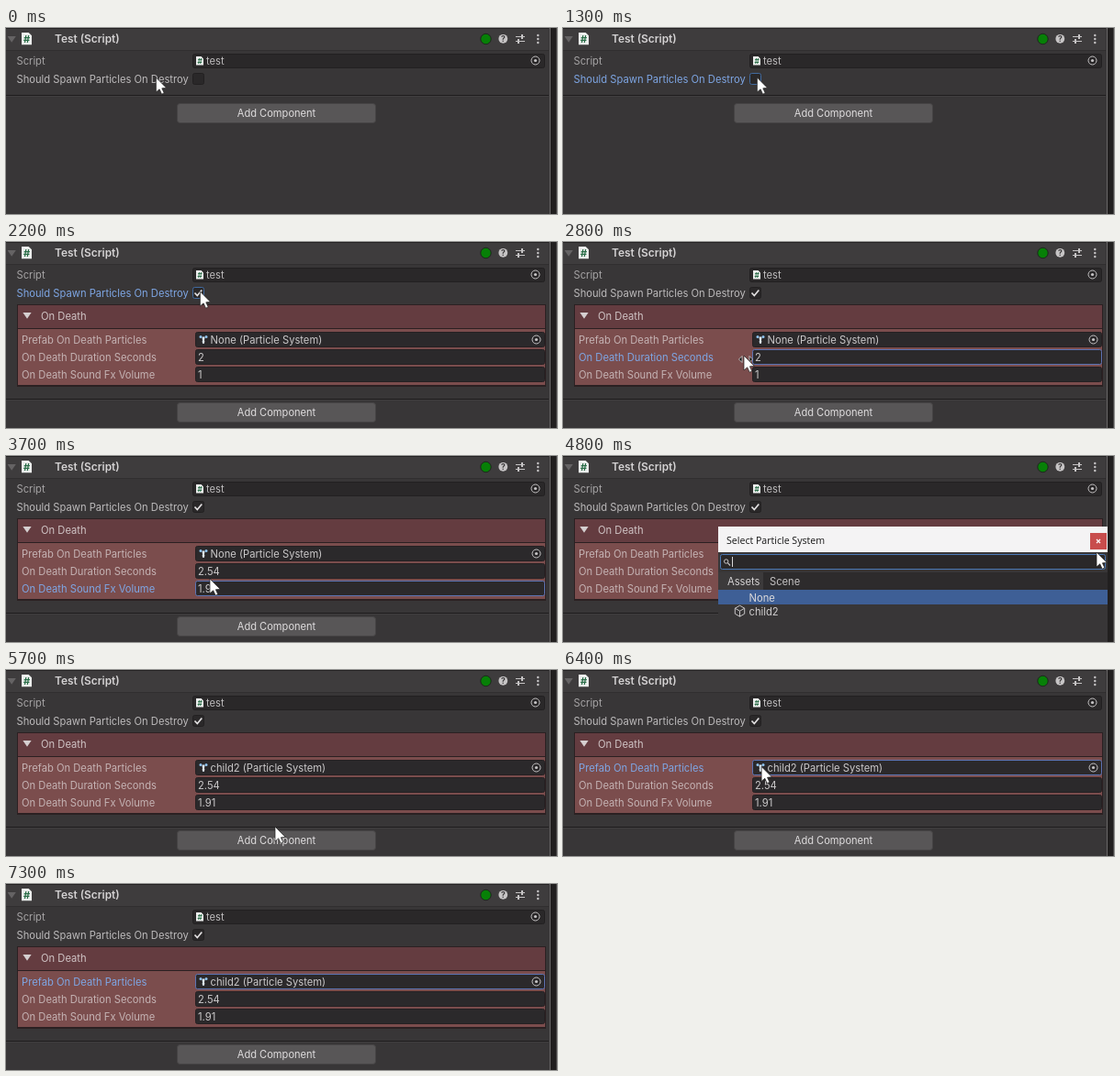
An HTML page with a canvas that plays this animation: 600 by 203 pixels, repeating every 8.2 s.

```html
<!DOCTYPE html>
<html lang="en">
<head>
<meta charset="utf-8">
<title>Inspector</title>
<style>
  html, body { margin: 0; width: 600px; height: 203px; overflow: hidden; background: #383637; }
  canvas { display: block; width: 600px; height: 203px; }
</style>
</head>
<body>
<canvas id="stage"></canvas>
<script>
const LOOP = 8200, STEP = 100;
const canvas = document.getElementById('stage');
const dpr = window.devicePixelRatio || 1;
canvas.width = 600 * dpr;
canvas.height = 203 * dpr;
const ctx = canvas.getContext('2d');

const FONT = 'Inter, "Open Sans", sans-serif';
const LABEL = '#bdbbbc', ICON = '#c6c4c5', DARK = '#2a2829', EDGE = '#222021';
const BLUE = '#7ea6e4', RED_LABEL = '#c5b3b4', BACK = '#383637';
const ARROW = new Path2D('M0 0V16L3.7 12.8 6.2 18.2 8.8 17 6.4 11.8 11.3 11.4Z');

// Pointer moves after the opening sweep; bow lifts the middle of the way
const MOVES = [
  { from: 2200, to: 2700, x: 197, y: 124, bow: 78 },
  { from: 2900, to: 3200, x: 215, y: 125 },
  { from: 3200, to: 3400, x: 192, y: 140 },
  { from: 3400, to: 3700, x: 222, y: 134 },
  { from: 3900, to: 4600, x: 581, y: 105 },
  { from: 4800, to: 5200, x: 223, y: 168 },
  { from: 5400, to: 5700, x: 293, y: 171 },
  { from: 5700, to: 6600, x: 205, y: 96 },
  { from: 6800, to: 7200, x: 43, y: 83 }
];

const clamp = v => Math.min(1, Math.max(0, v));
const progress = (t, from, to) => clamp((t - from) / (to - from));
const smooth = k => k * k * (3 - 2 * k);
const mix = (a, b, k) => a + (b - a) * k;

function sweep(k) {
  const turn = 2 * Math.PI * k;
  return { x: 293 - 275 * Math.cos(1.08 - turn) + 48 * k, y: 54 + 48 * Math.sin(turn) };
}

function pointerAt(t) {
  let p = sweep(progress(t, 0, 900));
  for (const { from, to, x, y, bow = 0 } of MOVES) {
    const k = smooth(progress(t, from, to));
    p = { x: mix(p.x, x, k), y: mix(p.y, y, k) - bow * Math.sin(Math.PI * k) };
  }
  return p;
}

function rect(x, y, w, h, fill) {
  ctx.fillStyle = fill;
  ctx.fillRect(x, y, w, h);
}

function paint(path, fill, edge, width = 1) {
  if (fill) { ctx.fillStyle = fill; ctx.fill(path); }
  if (edge) { ctx.strokeStyle = edge; ctx.lineWidth = width; ctx.stroke(path); }
}

function box(x, y, w, h, fill, edge, r = 2) {
  const path = new Path2D();
  path.roundRect(x + .5, y + .5, w - 1, h - 1, r);
  paint(path, fill, edge);
}

function disc(x, y, r, fill, edge) {
  const path = new Path2D();
  path.arc(x, y, r, 0, 7);
  paint(path, fill, edge);
}

const line = (d, color, width) => paint(new Path2D(d), null, color, width);

function triangle(x, y, fill) {
  paint(new Path2D(`M${x - 4.6} ${y}h9.2l-4.6 6.8Z`), fill);
}

function text(s, x, y, color = LABEL, size = 11.2, weight = 400, family = FONT) {
  ctx.font = `${weight} ${size}px ${family}`;
  ctx.fillStyle = color;
  ctx.fillText(s, x, y);
}

function centered(...args) {
  ctx.textAlign = 'center';
  text(...args);
  ctx.textAlign = 'left';
}

function page(x, y, w) {
  const h = w * 1.2;
  paint(new Path2D(`M${x} ${y}h${w * .7}l${w * .3} ${h * .25}v${h * .75}h${-w}Z`), '#eceeed');
  centered('#', x + w / 2, y + h * .8, '#276b45', w, 700);
}

function picker(x, y) {
  disc(x, y, 4.5, null, ICON);
  disc(x, y, 1.6, ICON);
}

function fountain(x, y) {
  for (let i = -1; i <= 1; i++) {
    disc(x + 3 * i, y - 1.7 - 1.3 * i * i, 1.5, i ? '#8fc4ef' : '#dce8f2');
    disc(x, y + 1.8 + 1.5 * i, 1.2, '#dce8f2');
  }
}

function cube(x, y, r) {
  const corner = i => {
    const a = Math.PI * (i / 3 - .5);
    return `${x + r * Math.cos(a)} ${y + r * Math.sin(a)}`;
  };
  const ring = Array.from({ length: 6 }, (_, i) => corner(i)).join('L');
  line(`M${ring}Z`, ICON);
  for (const i of [1, 3, 5]) line(`M${x} ${y}L${corner(i)}`, ICON);
}

function header() {
  rect(0, 0, 591, 24, '#3e3c3d');
  rect(0, 0, 591, 1, '#242223');
  rect(0, 24, 591, 1, '#302e2f');
  triangle(6.2, 9, '#656364');
  page(17, 5, 11);
  text('Test (Script)', 53, 16, '#d4d2d3', 11.9, 600);
  disc(522.5, 12, 5.7, '#078007', '#1d261d');
  disc(541.3, 11.8, 4.9, ICON);
  centered('?', 541.3, 15, BACK, 8.5, 700);
  line('M555 9.5h10M555 14.5h10', ICON);
  line('M562 7v5M558 12v5', ICON, 2);
  for (const y of [8, 12, 16]) disc(579.3, y, 1.2, ICON);
}

function basics(s) {
  const focused = s.focus === 'toggle';
  text('Script', 11.5, 40, '#a5a3a4');
  box(203, 28, 384, 16, DARK, EDGE);
  page(207, 31, 8);
  text('test', 218, 40);
  picker(576.5, 35.5);
  text('Should Spawn Particles On Destroy', 11.5, 60, focused ? BLUE : LABEL);
  box(203, 49, 13, 13, DARK, focused ? '#416a9f' : EDGE);
  if (s.on) line('M205.5 55.5l2.8 3 5-6', '#e2e0e1', 1.7);
}

function panel(s) {
  rect(12, 68, 576, 90, '#2b2022');
  rect(13, 69, 574, 25, '#643c40');
  rect(13, 95, 574, 61, '#7b4d4d');
  triangle(23, 77, '#d5cfd0');
  text('On Death', 38, 85, '#d0c4c5');
  const rows = [
    ['prefab', 'Prefab On Death Particles', s.prefab + ' (Particle System)'],
    ['duration', 'On Death Duration Seconds', s.duration],
    ['volume', 'On Death Sound Fx Volume', s.volume]
  ];
  rows.forEach(([key, name, value], i) => {
    const y = 98 + 19 * i, focused = s.focus === key, object = key === 'prefab';
    text(name, 17, y + 12.5, focused ? BLUE : RED_LABEL);
    box(206, y, 381, 17, '#2b292b', focused ? '#5d74b4' : '#252022');
    text(value, object ? 222.5 : 209, y + 12.5, '#cbc9ca');
    if (object) {
      fountain(215, y + 8.5);
      picker(577.5, y + 8.5);
    }
  });
}

function footer(y, gap) {
  rect(0, y, 591, 1, '#1e1c1d');
  rect(0, y + 1, 591, 1, '#403e3f');
  box(186, y + gap, 217, 22, '#585657', '#464445', 3);
  centered('Add Component', 294.5, y + gap + 15, '#e0dedf', 11.1);
}

function popup(s) {
  rect(169, 77, 424, 29, '#f4f3f4');
  text('Select Particle System', 178, 96, '#161616', 10.6, 400, '"Open Sans", "Noto Sans", sans-serif');
  rect(574, 84, 18, 18, '#c84d4d');
  line('M581 91l4 4m0-4l-4 4', '#fff', 1.2);
  rect(169, 105, 424, 98, BACK);
  box(171, 107, 420, 17, DARK, '#4b78b5');
  disc(177.7, 115, 2.2, null, ICON);
  line('M179.4 116.7l2.6 2.8', ICON, 1.2);
  rect(184, 110, 1, 11, '#d8d6d7');
  rect(169, 127, 424, 19, '#2d2b2c');
  rect(169, 127, 49, 19, '#3c3a3b');
  text('Assets', 179, 140.5, '#d4d2d3');
  text('Scene', 225, 140.5, '#c4c2c3');
  rect(169, s.picked ? 162 : 146, 424, 16, '#3e5f96');
  text('None', 202.5, 158.5, '#dcdadb');
  text('child2', 202.5, 173.5, '#cfcdce');
  cube(192.5, 169.2, 6);
}

function pointer({ x, y }) {
  ctx.save();
  ctx.translate(x, y);
  if (x < 206 && y > 116 && y < 152) {
    for (const d of [-1, 1])
      paint(new Path2D(`M${2 + d * 7.5} 4L${2 + d * 4} .5v7Z`), '#111', '#ddd', .8);
  }
  paint(ARROW, '#fff', '#222', .7);
  ctx.restore();
}

function focusAt(t) {
  if (t < 1200) return '';
  if (t < 2700) return 'toggle';
  if (t < 3400) return 'duration';
  if (t < 4600) return 'volume';
  return t < 6300 ? '' : 'prefab';
}

// A dragged number gains 0.03 per pixel
function dragged(t, start, from, to) {
  const at = pointerAt(Math.min(to, Math.max(from, t))).x;
  return String(+(start + .03 * (at - pointerAt(from).x)).toFixed(2));
}

function draw(t) {
  const picked = t >= 5200;
  const s = {
    picked,
    on: t >= 1400,
    focus: focusAt(t),
    prefab: picked ? 'child2' : 'None',
    duration: dragged(t, 2, 2900, 3200),
    volume: t < 3700 ? dragged(t, 1, 3400, 3700) : '1.91'
  };
  ctx.setTransform(dpr, 0, 0, dpr, 0, 0);
  rect(0, 0, 600, 203, BACK);
  header();
  basics(s);
  if (s.on) panel(s);
  if (s.on) footer(171, 4); else footer(73, 9);
  rect(592, 0, 1, 203, '#6a6868');
  rect(593, 0, 6, 203, '#211f1f');
  rect(599, 0, 1, 203, '#4a4848');
  if (t >= 4600 && t < 5500) popup(s);
  if (t < 7300) pointer(pointerAt(t));
}

function tick() {
  const t = performance.now() % LOOP;
  draw(Math.floor(t / STEP) * STEP);
  requestAnimationFrame(tick);
}
tick();
</script>
</body>
</html>
```
